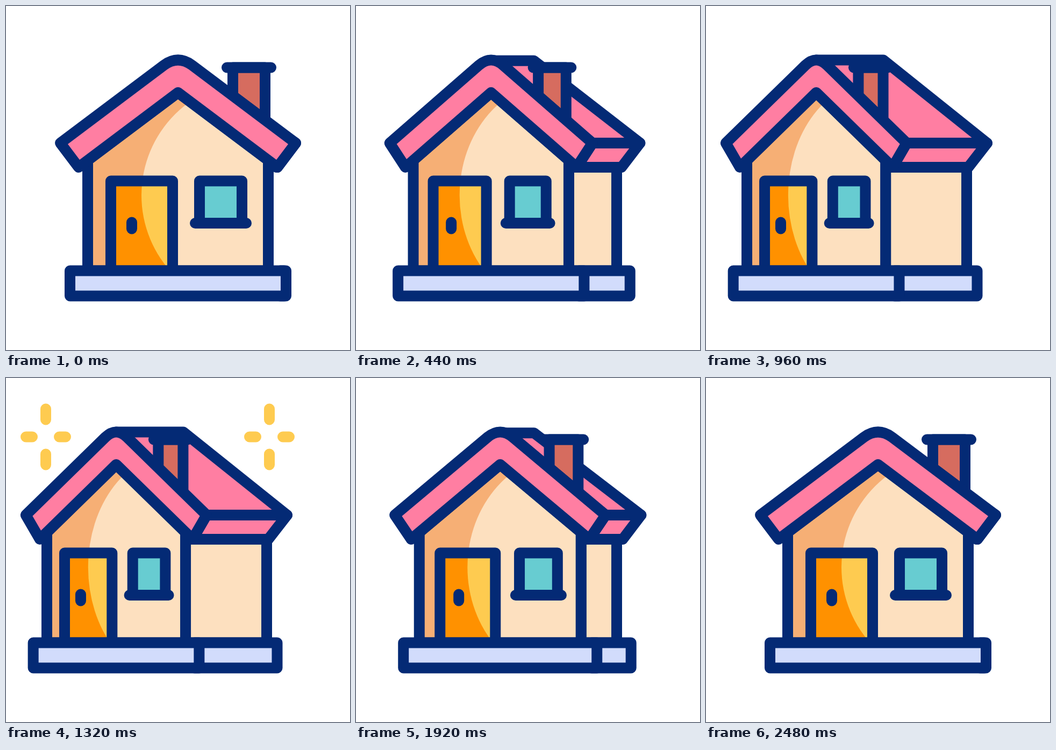
These frames come from a looping animation (640 by 640 pixels, 3000 ms). An HTML page with a canvas:

```html
<!DOCTYPE html>
<html lang="en">
<head>
<meta charset="utf-8">
<title>Turning house</title>
<style>
html, body { margin: 0; height: 100%; overflow: hidden; background: #fff; }
canvas { display: block; width: 100vw; height: 100vh; }
</style>
</head>
<body>
<canvas id="stage" width="640" height="640"></canvas>
<script>
const ctx = document.getElementById('stage').getContext('2d');
const LOOP = 3000;
const NAVY = '#042a75', PINK = '#ff7ea2', CREAM = '#fde0bf', PEACH = '#f6af75',
  ORANGE = '#ff9100', YELLOW = '#fecb50', TEAL = '#67ccd1', ICE = '#d2dcfc', BRICK = '#d66c5f';

const clamp = v => Math.min(1, Math.max(0, v));
const mix = (a, b, k) => a + (b - a) * k;

// Cubic Bezier easing with control points (a, 0) and (b, 1)
function ease(x, a, b) {
  let lo = 0, hi = 1;
  for (let i = 0; i < 24; i++) {
    const s = (lo + hi) / 2, r = 1 - s;
    if (3 * a * s * r * r + 3 * b * s * s * r + s * s * s < x) lo = s; else hi = s;
  }
  return lo * lo * (3 - 2 * lo);
}

const turnAt = t => t < 1480
  ? ease(clamp(t / 1000), .63, .14)
  : 1 - ease(clamp((t - 1480) / 840), .5, .5);

function polyline(points, closed) {
  const path = new Path2D();
  points.forEach(([x, y]) => path.lineTo(x, y));
  if (closed) path.closePath();
  return path;
}

function paint(path, fill) {
  if (fill) {
    ctx.fillStyle = fill;
    ctx.fill(path);
  }
  ctx.stroke(path);
}

const line = (...points) => paint(polyline(points));
const shape = (fill, ...points) => paint(polyline(points, true), fill);

function drawBack(turn, X) {
  const eave = mix(536.5, 523, turn), low = mix(503, 488, turn), end = mix(517.6, 504.5, turn);
  shape(CREAM, [X(168), 300], [485, 300], [485, 492.5], [X(168), 492.5]);
  shape(ICE, [X(190), 492.5], [end, 492.5], [end, 539.5], [X(190), 539.5]);
  const ridge = [mix(332, 330, turn), mix(103.5, 100.5, turn)];
  shape(PINK, [X(0), ridge[1]], ridge, [eave, 255], [low, 300], [X(185), 300], [X(219), 255]);
  line([X(219), 255], [eave, 255]);
}

function drawChimney(X) {
  shape(BRICK, [X(102), 114.5], [X(162), 114.5], [X(162), 212], [X(102), 167]);
  line([X(91), 114.5], [X(173), 114.5]);
}

function drawFront(X, scale) {
  const rect = (l, t, r, b) => [[X(l), t], [X(r), t], [X(r), b], [X(l), b]];

  function shaded(points, dark, light) {
    const path = polyline(points, true);
    ctx.fillStyle = dark;
    ctx.fill(path);
    ctx.save();
    ctx.clip(path);
    ctx.beginPath();
    ctx.ellipse(X(145), 352, 213 * scale, 213, 0, 0, 2 * Math.PI);
    ctx.fillStyle = light;
    ctx.fill();
    // The lit area continues to the right of the curve
    ctx.fillRect(X(145), 0, 640, 640);
    ctx.restore();
    ctx.stroke(path);
  }

  shaded([[X(0), 161], [X(168), 287], [X(168), 492.5], [X(-168), 492.5], [X(-168), 287]], PEACH, CREAM);
  shaded(rect(-125, 325.5, -10, 492.5), ORANGE, YELLOW);
  line([X(-86), 402.5], [X(-86), 414.5]);
  shape(TEAL, ...rect(40, 325.5, 119, 404));
  line([X(32), 404], [X(127), 404]);
  shape(ICE, ...rect(-201, 492.5, 201, 539.5));

  const roof = new Path2D();
  roof.moveTo(X(-219), 255);
  roof.lineTo(X(-26), 110);
  roof.quadraticCurveTo(X(0), 91, X(26), 110);
  [[219, 255], [185, 300], [0, 161], [-185, 300]].forEach(([x, y]) => roof.lineTo(X(x), y));
  roof.closePath();
  paint(roof, PINK);
}

// Four dashes that burst out of one centre
function drawSparkle(cx, cy, k) {
  const path = new Path2D();
  for (const side of [-1, 1]) {
    const tall = 14 + 38 * k, wide = 8 + 29 * k;
    path.moveTo(cx, cy + side * Math.max(0, tall - 20));
    path.lineTo(cx, cy + side * tall);
    path.moveTo(cx + side * Math.max(0, wide - 12), cy);
    path.lineTo(cx + side * wide, cy);
  }
  ctx.save();
  ctx.globalAlpha = k;
  ctx.strokeStyle = YELLOW;
  ctx.stroke(path);
  ctx.restore();
}

function draw(t) {
  const turn = turnAt(t), scale = mix(1, .768, turn), apex = mix(320, 205, turn);
  const X = offset => apex + offset * scale;
  ctx.fillStyle = '#fff';
  ctx.fillRect(0, 0, 640, 640);
  ctx.lineWidth = 20;
  ctx.lineCap = ctx.lineJoin = 'round';
  ctx.strokeStyle = NAVY;

  drawBack(turn, X);
  drawChimney(X);
  drawFront(X, scale);

  const glow = clamp(Math.min((t - 980) / 140, (1640 - t) / 280));
  if (glow > 0) [74, 490].forEach(x => drawSparkle(x, 109.5, glow));
}

const start = performance.now();
function tick() {
  draw((performance.now() - start) % LOOP);
  requestAnimationFrame(tick);
}
tick();
</script>
</body>
</html>
```
